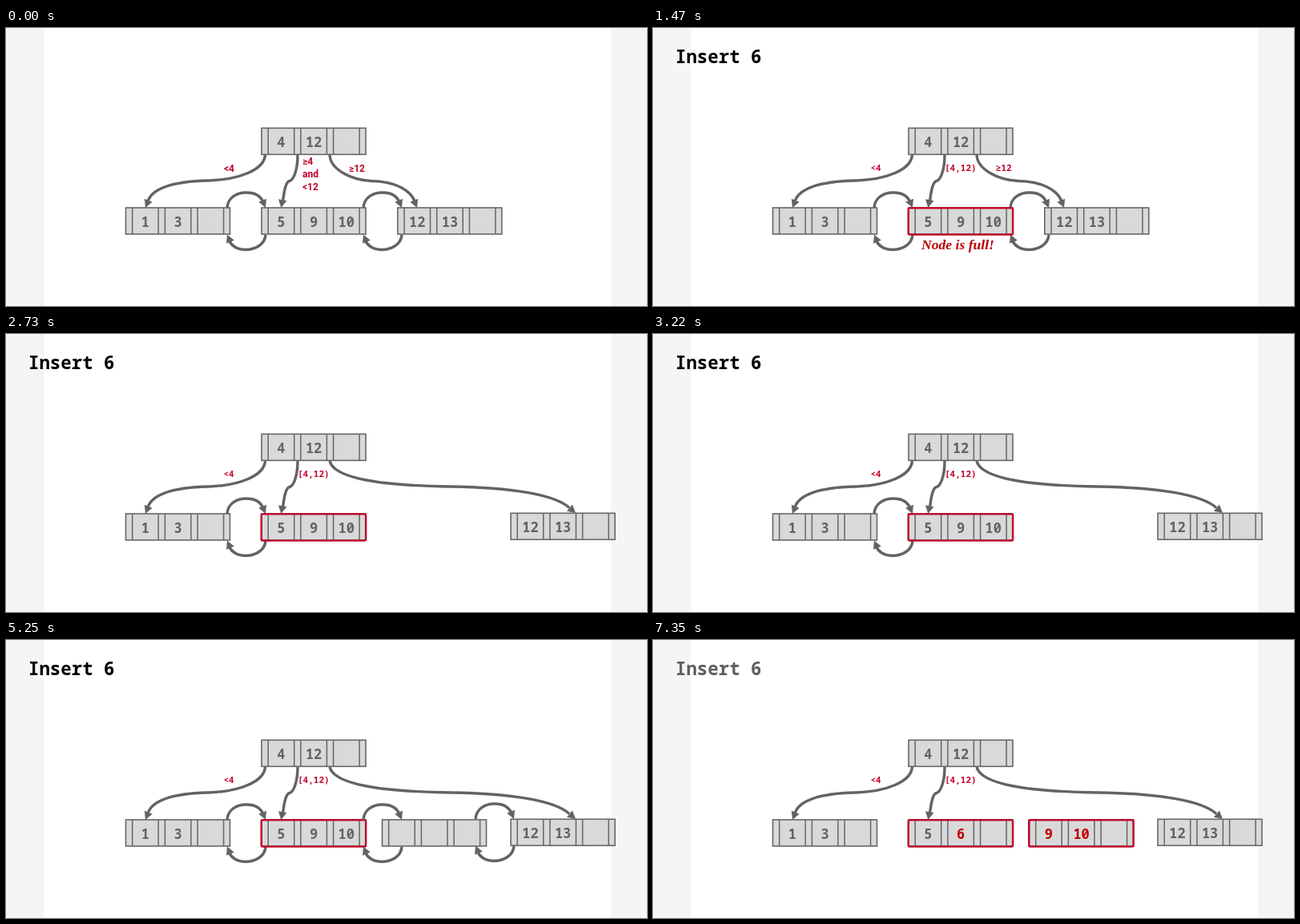
An HTML page for the animation above (8000 ms loop, 800 by 348 pixels).

```html
<!DOCTYPE html>
<html lang="en">
<head>
<meta charset="utf-8">
<title>B+ tree insert</title>
<style>
  html, body { margin: 0; width: 100%; height: 100%; overflow: hidden; background: #fff; }
  svg { display: block; width: 100%; height: 100%; }
  text { white-space: pre; }
  .key { font: 700 17px "Noto Sans Mono", monospace; text-anchor: middle; fill: #636363; }
  .key.hot { fill: #c00000; }
  .title { font: 700 22.4px "Noto Sans Mono", monospace; }
  .tag { font: 700 12px Roboto, sans-serif; fill: #c4002b; }
  .tag.mono { font: 600 11px "Noto Sans Mono", monospace; }
  .full { font: italic 700 17.6px "Liberation Serif", serif; fill: #b50000; }
  .box { fill: #d9d9d9; stroke: #666; stroke-width: 1.6; }
  .bars { fill: none; stroke: #666; stroke-width: 1.5; }
  .ring { fill: none; stroke: #c60027; stroke-width: 2.4; }
  .wire { fill: none; stroke: #636363; stroke-width: 3.4; }
  .head { fill: #636363; }
</style>
</head>
<body>
<svg id="stage" viewBox="0 0 800 348" preserveAspectRatio="none">
  <rect width="800" height="348" fill="#fff"/>
  <rect width="47.5" height="348" fill="#f5f5f5"/>
  <rect x="755" width="45" height="348" fill="#f5f5f5"/>
</svg>
<script>
const LOOP = 8000;
const INSERT = 1400, SHIFT = 2730, LINK = 4060, SPLIT = 5530, UNLINK = 6790;
const stage = document.getElementById('stage');
const layers = [];

// A group shown only while from <= t < to.
function layer(from, to, ...parts) {
  const g = document.createElementNS('http://www.w3.org/2000/svg', 'g');
  g.innerHTML = parts.join('');
  stage.append(g);
  layers.push({ g, from, to });
}

const label = (cls, x, y, s, extra = '') =>
  `<text class="${cls}" x="${x}" y="${y}" ${extra}>${s.replace('<', '&lt;')}</text>`;

function node(x, y) {
  const bars = [8.2, 40.7, 48.9, 81.4, 89.6, 122.1]
    .map(d => `M${x + d} ${y}v33`).join('');
  return `<rect class="box" x="${x}" y="${y}" width="130" height="33"/><path class="bars" d="${bars}"/>`;
}

const key = (x, y, slot, s, hot = '') =>
  label('key ' + hot, x + 24.4 + slot * 40.7, y + 23.8, String(s), '');

const ring = x =>
  `<rect class="ring" x="${x - .3}" y="225.4" width="130.4" height="33.2" rx="1.5"/>`;

// Curve with an arrowhead whose tip sits at (x, y), pointing along angle.
const arrow = (d, x, y, angle) =>
  `<path class="wire" d="${d}"/><path class="head" d="M0 0L-10 -5.3V5.3Z" transform="translate(${x} ${y}) rotate(${angle})"/>`;

// Pair of sibling links between two neighbouring leaves.
const links = (dx, dy = 0) => `<g transform="translate(${dx} ${dy})">` +
  arrow('M276 225C277 212 288 206 300 206C311 206 318 211 321 218', 324, 225, 67) +
  arrow('M324 259C323 271 311 277.5 299 277.5C288 277.5 281 272 278.5 266', 276, 258.5, 247) +
  '</g>';

const L = 149.5, M = 319, N = 469.5, R = 488.8, FAR = 630;
const Y = 225, FY = 224.3;

layer(0, LOOP,
  arrow('M323.5 159C322 178 290 190 252 191C212 192 183 199 177 217', 174, 225, 112),
  arrow('M364 159C364 178 359 190 354 191.5C349 192 347 205 345.5 217', 343.3, 225, 101),
  node(319, 125.3), key(319, 125.3, 0, 4), key(319, 125.3, 1, 12),
  node(L, Y), key(L, Y, 0, 1), key(L, Y, 1, 3),
  node(M, Y), key(M, Y, 0, 5));

layer(0, SHIFT,
  arrow('M404 159C405 177 430 190 456 191.5C486 192 505 203 510 217', 513, 225, 68),
  node(R, Y), key(R, Y, 0, 12), key(R, Y, 1, 13),
  links(170));

layer(SHIFT, LOOP,
  arrow('M404 159C410 183 480 190 555 191C630 192 685 201 703 217.5', 711, 224, 40),
  node(FAR, FY), key(FAR, FY, 0, 12), key(FAR, FY, 1, 13));

layer(0, UNLINK, links(0));
layer(0, SPLIT, key(M, Y, 1, 9), key(M, Y, 2, 10));

layer(0, INSERT,
  label('tag', 272, 179.5, '<4'),
  label('tag', 370, 171, '≥4'),
  label('tag', 370, 187, 'and'),
  label('tag', 370, 203.3, '<12'),
  label('tag', 428, 179.5, '≥12'));

layer(INSERT, LOOP,
  label('tag mono', 271.5, 179, '<4'),
  label('tag mono', 364, 179, '[4,12)'),
  ring(M));

layer(INSERT, SHIFT,
  label('tag mono', 427.8, 179, '≥12'),
  label('full', 335, 277, 'Node is full!'));

layer(INSERT, SPLIT, label('title', 28, 44, 'Insert 6', 'fill="#000"'));
layer(SPLIT, LOOP, label('title', 28, 44, 'Insert 6', 'fill="#5e5e5e"'));

layer(LINK, LOOP, node(N, Y));
layer(LINK, UNLINK, links(170), links(310, -1));

layer(SPLIT, LOOP,
  key(M, Y, 1, 6, 'hot'),
  key(N, Y, 0, 9, 'hot'), key(N, Y, 1, 10, 'hot'),
  ring(N));

function draw(t) {
  for (const { g, from, to } of layers)
    g.style.display = t >= from && t < to ? '' : 'none';
}

const start = performance.now();
function tick() {
  draw((performance.now() - start) % LOOP);
  requestAnimationFrame(tick);
}
tick();
</script>
</body>
</html>
```
